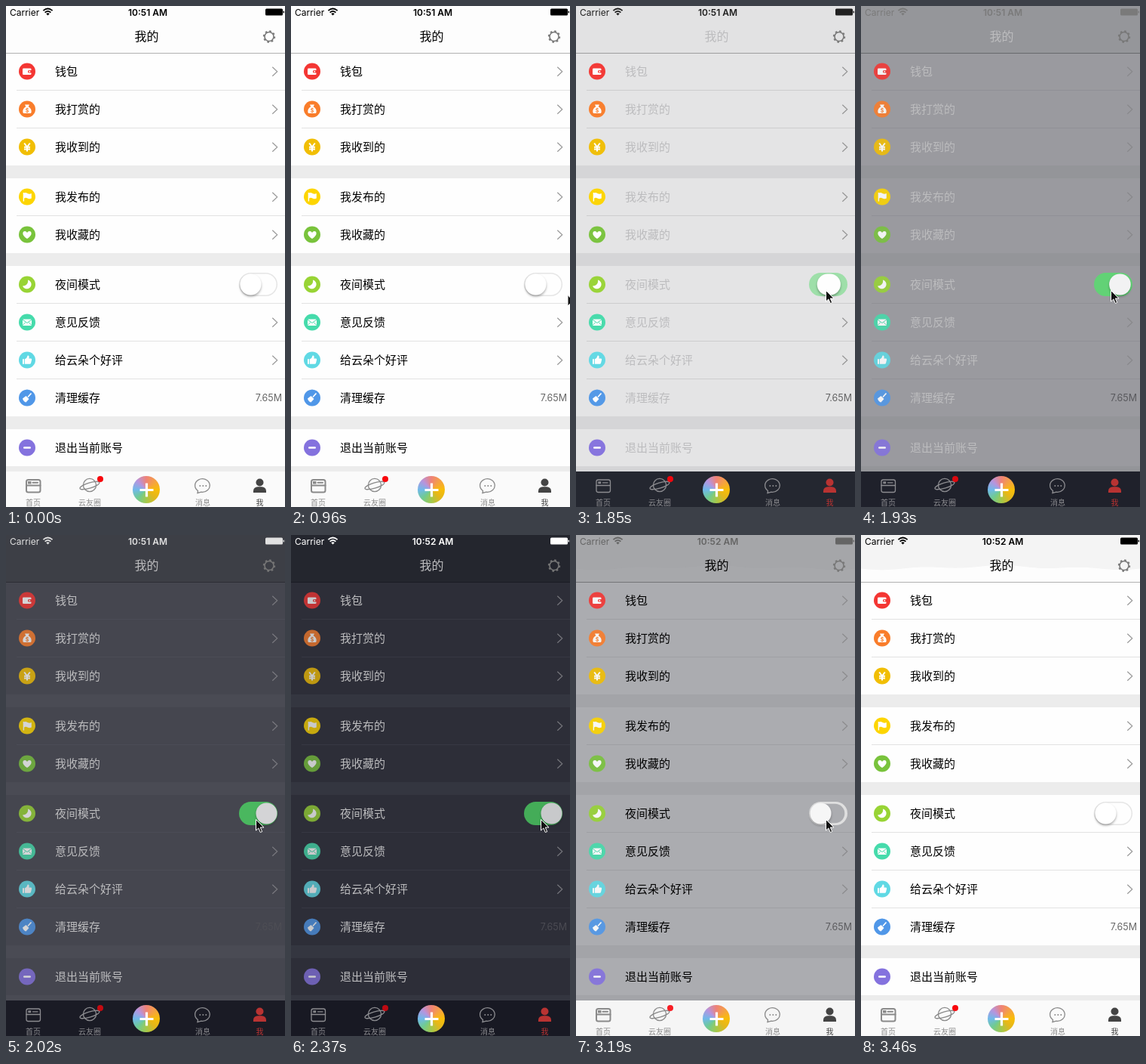
These frames come from a looping animation (370 px wide and 663 px high, 4580 ms). An HTML page:

```html
<!DOCTYPE html>
<html lang="zh">
<head>
<meta charset="utf-8">
<style>
html, body { margin: 0; width: 100%; height: 100%; overflow: hidden; }
svg { display: block; width: 100vw; height: 100vh; }
text { font-family: "Noto Sans CJK SC", "Noto Sans CJK", sans-serif; font-size: 15px; fill: var(--text); }
.status { fill: var(--status); }
.status text, .size { font-family: Inter, sans-serif; font-size: 12px; fill: inherit; }
.status .clock { font-weight: 600; }
.size { font-size: 12.5px; fill: var(--size); }
.title { font-size: 16px; font-weight: 500; }
.mid { text-anchor: middle; }
.rule { stroke: var(--rule); }
.chevron { fill: none; stroke: var(--chevron); stroke-width: 1.2; }
.dim { opacity: var(--dim); }
.glyph { fill: #fff; stroke: none; }
.line { fill: none; stroke: #fff; }
.tabs text { font-size: 10px; fill: var(--label); }
.tabs .me { fill: var(--me); }
.tabicon { fill: none; stroke: var(--label); stroke-width: var(--weight); stroke-linecap: round; }
.wheel { width: 36px; height: 36px; border-radius: 50%;
  background: conic-gradient(#ee8278, #f5a044, #f8bd08, #e2b71c, #a3c94d, #70cb92, #70b9ea, #b794dd, #ee8278); }
</style>
</head>
<body>
<svg id="stage" viewBox="0 0 370 663" xmlns="http://www.w3.org/2000/svg"></svg>
<script>
const LOOP = 4580;
const stage = document.getElementById('stage');

const icons = {
  wallet: c => `<rect class="glyph" x="-6" y="-4" width="11.5" height="8.5" rx="1.3"/>
    <rect x="1" y="-1.6" width="6" height="3.6" rx="1.5" fill="${c}"/><circle class="glyph" cx="3.3" cy=".2" r="1"/>`,
  bag: c => `<path class="glyph" d="M-3-6H3L1.7-3.3C5-1.5 6 1 5.6 4Q5.4 5.5 4 5.5H-4Q-5.4 5.5-5.6 4C-6 1-5-1.5-1.7-3.3Z"/>
    <text class="mid" y="4.2" style="font:bold 7px Inter,sans-serif;fill:${c}">$</text>`,
  yen: () => `<path class="line" stroke-width="2" d="M-3.8-5L0 0L3.8-5M0 0V6M-4 .3H4M-4 3H4"/>`,
  flag: () => `<path class="line" stroke-width="1.4" d="M-4.6-5.5V6"/>
    <path class="glyph" d="M-4-5Q-2-6 .5-4.5T5.8-4.5V2Q3 3.3 .5 2T-4 2Z"/>`,
  heart: () => `<path class="glyph" d="M0 5.5C-8 .5-6-4.5-3-4.5Q-1-4.5 0-2.5Q1-4.5 3-4.5C6-4.5 8 .5 0 5.5Z"/>`,
  moon: () => `<path class="glyph" d="M1-6A6 6 0 1 1-6 2A6.5 6.5 0 0 0 1-6Z"/>`,
  mail: c => `<rect class="glyph" x="-6" y="-4" width="12" height="8.5" rx="1"/>
    <path d="M-6-3.5L0 1L6-3.5M-6 4L-2 0M6 4L2 0" fill="none" stroke="${c}"/>`,
  thumb: () => `<path class="glyph" d="M-6-1.3H-3.8V5.3H-6ZM-3-1.3Q0-2.5 .3-5Q.5-6.3 1.5-6Q3.2-5.5 2.4-2H5Q6.5-2 6.1-.2L5 4.2Q4.7 5.3 3.5 5.3H-3Z"/>`,
  broom: () => `<path class="line" stroke-width="1.7" d="M5.5-6L1-1"/>
    <path class="glyph" d="M-1.5-2.5L2.5 1.5L-1.5 6Q-4.8 5.2-6 1Z"/>`,
  minus: () => `<path class="line" stroke-width="2.4" stroke-linecap="round" d="M-3.8 0H3.8"/>`
};

// centre y, icon, colour, label, accessory
const rows = [
  [86.5, 'wallet', '#f43633', '钱包', 'chevron'],
  [136.5, 'bag', '#f97d2b', '我打赏的', 'chevron'],
  [186.5, 'yen', '#f1be04', '我收到的', 'chevron'],
  [252.5, 'flag', '#fdd500', '我发布的', 'chevron'],
  [302.5, 'heart', '#79c33c', '我收藏的', 'chevron'],
  [368.5, 'moon', '#98d435', '夜间模式'],
  [418.5, 'mail', '#45dbab', '意见反馈', 'chevron'],
  [468.5, 'thumb', '#60d9e4', '给云朵个好评', 'chevron'],
  [518.5, 'broom', '#5097e8', '清理缓存', 'size'],
  [584.5, 'minus', '#8472de', '退出当前账号']
];

const accessory = {
  chevron: y => `<path class="chevron" d="M353.3 ${y - 5.7}l6.4 6-6.4 6"/>`,
  size: y => `<text class="size" x="366" y="${y + 4.5}" text-anchor="end">7.65M</text>`
};

const rowMarkup = ([y, icon, color, label, extra]) => `
  <g class="dim" transform="translate(28 ${y})"><circle r="11" fill="${color}"/>${icons[icon](color)}</g>
  <text x="65" y="${y + 5.7}">${label}</text>${extra ? accessory[extra](y) : ''}`;

const gap = (y, h) => `<rect y="${y}" width="370" height="${h}" fill="var(--gap)"/>`;
const rule = y => `<path class="rule" d="M14 ${y}.5H370"/>`;
const tabLabel = (x, label, cls = '') => `<text class="mid ${cls}" x="${x}" y="661">${label}</text>`;

let edge = 'M0 0V42';
for (let x = 0; x <= 370; x += 5) {
  edge += `L${x} ${(43 + 1.5 * Math.sin(x / 17) - 1.8 * Math.sin(x / 47 + 4)).toFixed(1)}`;
}

stage.innerHTML = `
  <rect width="370" height="663" fill="var(--cell)"/>
  ${gap(211, 17)}${gap(327, 17)}${gap(543, 17)}${gap(609, 7)}
  ${[111, 161, 277, 393, 443, 493].map(rule).join('')}
  ${rows.map(rowMarkup).join('')}

  <rect width="370" height="62" fill="var(--nav)"/>
  <path id="band" d="${edge}V0Z" fill="var(--band)"/>
  <path d="M0 62.5H370" stroke="var(--navline)"/>
  <text class="title mid" x="186.5" y="46.3">我的</text>
  <g fill="none" stroke="#777" transform="translate(349 40.5)">
    <circle r="6" stroke-width="1.6"/>
    <circle r="7.3" stroke-width="1.8" stroke-dasharray="2.6 3.133"/>
  </g>
  <g class="status">
    <text x="5" y="12.5">Carrier</text>
    <path d="M49.4 6.2Q55.5 .8 61.6 6.2M51.6 8.6Q55.5 5 59.4 8.6" fill="none" stroke="var(--status)" stroke-width="1.7"/>
    <path d="M53.3 10.2Q55.5 8.4 57.7 10.2L55.5 12.6Z"/>
    <text id="clock" class="clock mid" x="188" y="12.5"></text>
    <rect x="344" y="3.5" width="23" height="9" rx="1.5"/><rect x="367.6" y="6.5" width="1.4" height="3" rx=".7"/>
  </g>

  <g class="dim">
    <rect id="track" x="309" y="353" width="51" height="31" rx="15.5"/>
    <rect id="inner" x="-24" y="-14" width="48" height="28" rx="14" fill="var(--cell)"/>
    <rect id="knob" y="354.5" height="28" rx="14" fill="#fff" style="filter:drop-shadow(0 2px 1.5px rgba(0,0,0,.32))"/>
  </g>

  <g class="tabs">
    <rect y="616" width="370" height="47" fill="var(--tab)"/>
    <g class="tabicon">
      <rect x="27" y="627" width="18.5" height="16.5" rx="2.5"/>
      <path d="M27 634.5H45.5M35.5 630.8H42"/><rect x="30" y="630" width="2.5" height="1.5"/>
    </g>
    <g class="tabicon" style="stroke-width:1.3">
      <circle cx="111" cy="634" r="8.6"/>
      <ellipse cx="111" cy="634.5" rx="13.5" ry="3.6" transform="rotate(-17 111 634.5)"/>
      <path d="M254.5 641.5A9.8 8.8 0 1 1 259 643.2L254 644.5Z"/>
      <path stroke-width="2" d="M257.3 635h.01M261.3 635h.01M265.3 635h.01"/>
    </g>
    <circle class="dim" cx="125" cy="626" r="4" fill="#f8060c"/>
    <foreignObject x="168" y="622" width="36" height="36"><div class="wheel" xmlns="http://www.w3.org/1999/xhtml"></div></foreignObject>
    <path d="M177.5 640.5H195.5M186.5 631.5V649.5" stroke="#fff" stroke-width="3.2"/>
    <g class="me"><circle cx="336.5" cy="630.5" r="5"/><path d="M328 644V641.5Q328.5 636.5 334 636.2H339Q344.5 636.5 345 641.5V644Z"/></g>
    ${tabLabel(36, '首页')}${tabLabel(111, '云友圈')}${tabLabel(261, '消息')}${tabLabel(336.5, '我', 'me')}
  </g>
  <path id="cursor" d="M0 0V14.5L3.4 11.4L5.8 17L8.2 16L5.8 10.5H10.5Z" fill="#111" stroke="#fff"/>`;

const [band, clock, track, inner, knob, cursor] =
  ['band', 'clock', 'track', 'inner', 'knob', 'cursor'].map(id => document.getElementById(id));

const span = (t, from, to) => Math.min(1, Math.max(0, (t - from) / (to - from)));
const ease = u => u * u * (3 - 2 * u);
const easeOut = u => 1 - (1 - u) ** 3;
const lerp = (a, b, u) => a + (b - a) * u;
const channels = hex => [1, 3, 5].map(i => parseInt(hex.slice(i, i + 2), 16));
function mix(a, b, u) {
  const to = channels(b);
  return `rgb(${channels(a).map((v, i) => Math.round(lerp(v, to[i], u)))})`;
}

// day colour, night colour
const fades = {
  cell: ['#fefefe', '#2d2e38'], gap: ['#ececec', '#343640'], rule: ['#e2e2e2', '#373843'],
  nav: ['#fdfdfd', '#24262e'], band: ['#f4f4f4', '#2c2e37'], navline: ['#b0b0b0', '#1b1c23'],
  status: ['#000000', '#ffffff'], size: ['#666666', '#4b4b53'], chevron: ['#999999', '#75757b']
};

function render(t) {
  const dark = ease(span(t, 1785, 2085)) - ease(span(t, 3020, 3320));
  const night = t >= 1785 && t < 3020;
  const set = (name, value) => stage.style.setProperty('--' + name, value);
  for (const name in fades) set(name, mix(...fades[name], dark));
  set('dim', 1 - 0.26 * dark);
  set('text', night ? '#bcbcbe' : '#000');
  set('tab', night ? mix('#262932', '#181923', dark) : mix('#fafafa', '#ededed', dark));
  set('label', night ? '#8c8c90' : '#8a8a8a');
  set('me', night ? '#b93332' : '#444');
  set('weight', night ? 1.3 : 2);

  band.style.display = t >= 3020 ? '' : 'none';
  clock.textContent = t < 2370 ? '10:51 AM' : '10:52 AM';

  const on = ease(span(t, 1730, 1980)) - ease(span(t, 2930, 3180));
  const stretch = t < 2400
    ? ease(span(t, 1490, 1640)) * (1 - on)
    : ease(span(t, 2850, 2930)) * on;
  const width = 28 + 6 * stretch;
  const pull = t < 2400 ? 3 * stretch * (1 - on) : -3 * stretch * on;
  knob.setAttribute('width', width);
  knob.setAttribute('x', lerp(324.5, 345.5, on) + pull - width / 2);
  track.setAttribute('fill', mix('#e5e5e5', '#4cd964', on));
  const clear = 1 - easeOut(span(t, 1490, 1640)) + easeOut(span(t, 3060, 3300));
  inner.setAttribute('transform', `translate(334.5 368.5) scale(${clear})`);

  const enter = ease(span(t, 960, 1430));
  const x = lerp(367, 331.5, enter) + 20 * ease(span(t, 3190, 3370));
  cursor.style.display = t >= 960 && t < 3460 ? '' : 'none';
  cursor.setAttribute('transform', `translate(${x} ${lerp(382.5, 376.5, enter)})`);
}

const start = performance.now();
function tick() {
  render((performance.now() - start) % LOOP);
  requestAnimationFrame(tick);
}
tick();
</script>
</body>
</html>
```
